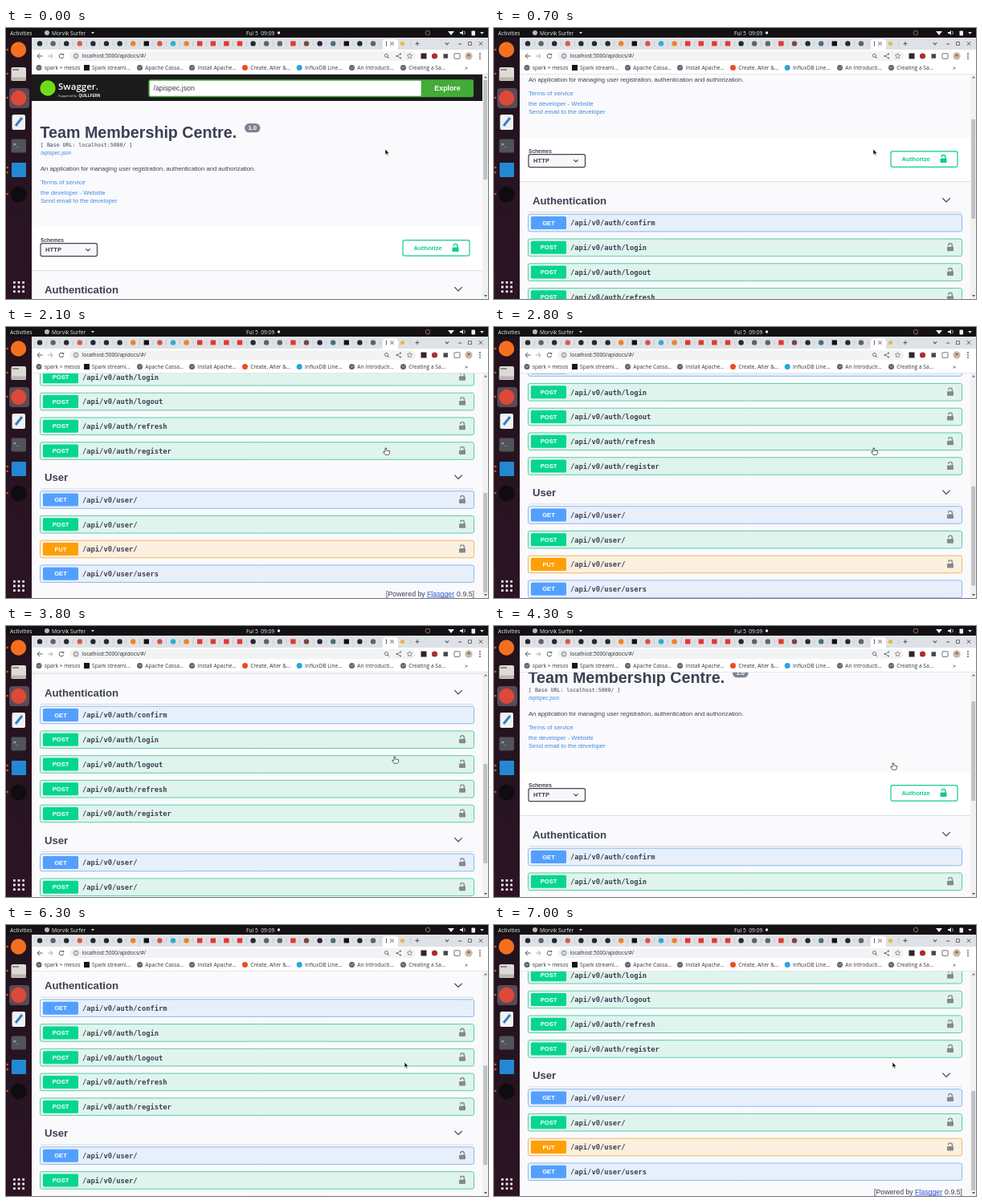
Write an HTML page with a canvas that moves like this. It is 600 px wide and 338 px high and loops after 7.1 s.

```html
<!DOCTYPE html>
<html lang="en">
<head>
<meta charset="utf-8">
<title>API docs</title>
<style>
html, body { margin: 0; width: 100%; height: 100%; overflow: hidden; background: #fff; }
canvas { display: block; width: 600px; height: 338px; }
</style>
</head>
<body>
<canvas id="stage"></canvas>
<script>
const LOOP = 7100, STEP = 100, W = 600, H = 338, TOP = 58, MAX_SCROLL = 322.5;
const SANS = '"Liberation Sans", Arial, sans-serif';
const MONO = '"DejaVu Sans Mono", monospace';
const UI = '"Open Sans", "Noto Sans", sans-serif';
const INK = '#3b4151', LINK = '#4688dd', GREEN = '#0dce8b';

const canvas = document.getElementById('stage');
const ctx = canvas.getContext('2d');
const dpr = window.devicePixelRatio || 1;
canvas.width = W * dpr;
canvas.height = H * dpr;

// Each key: time in ms followed by its values.
const scrollKeys = [[0, 0], [1300, 206], [2050, 322.5], [2500, 322.5], [2800, 303.5],
  [3800, 243], [4300, 66], [4550, 0], [5100, 0], [5700, 106], [6600, 322.5]];
const pointerKeys = [[0, 472, 151], [2900, 472, 151], [3800, 483, 163], [4300, 496, 171]];

const METHODS = {
  GET: { main: '#539fff', back: '#e7effb', edge: '#8abbea' },
  POST: { main: '#05d68f', back: '#dff4ed', edge: '#58cfa9' },
  PUT: { main: '#ff9f05', back: '#fbefdf', edge: '#f5b955' }
};
const OPERATIONS = [
  ['GET', 'auth/confirm', true], ['POST', 'auth/login'], ['POST', 'auth/logout'],
  ['POST', 'auth/refresh'], ['POST', 'auth/register'],
  ['GET', 'user/'], ['POST', 'user/'], ['PUT', 'user/'], ['GET', 'user/users', true]
];

function sample(keys, t) {
  const i = keys.findIndex(k => k[0] > t);
  if (i < 0) return keys[keys.length - 1].slice(1);
  const a = keys[i - 1], b = keys[i], p = (t - a[0]) / (b[0] - a[0]);
  return a.slice(1).map((v, n) => v + (b[n + 1] - v) * p);
}

function rect(x, y, w, h, fill) {
  ctx.fillStyle = fill;
  ctx.fillRect(x, y, w, h);
}

function box(x, y, w, h, r, fill, stroke, width = 1) {
  ctx.beginPath();
  ctx.roundRect(x, y, w, h, r);
  if (fill) { ctx.fillStyle = fill; ctx.fill(); }
  if (stroke) { ctx.strokeStyle = stroke; ctx.lineWidth = width; ctx.stroke(); }
}

function dot(x, y, r, fill) {
  ctx.beginPath();
  ctx.arc(x, y, r, 0, Math.PI * 2);
  ctx.fillStyle = fill;
  ctx.fill();
}

function ring(x, y, r, color, width = 1, from = 0, to = Math.PI * 2) {
  ctx.beginPath();
  ctx.arc(x, y, r, from, to);
  ctx.strokeStyle = color;
  ctx.lineWidth = width;
  ctx.stroke();
}

function line(points, color, width = 1) {
  ctx.beginPath();
  points.forEach(([x, y]) => ctx.lineTo(x, y));
  ctx.strokeStyle = color;
  ctx.lineWidth = width;
  ctx.stroke();
}

function shape(points, fill, stroke) {
  ctx.beginPath();
  points.forEach(([x, y]) => ctx.lineTo(x, y));
  ctx.closePath();
  ctx.fillStyle = fill;
  ctx.fill();
  if (stroke) { ctx.strokeStyle = stroke; ctx.lineWidth = 0.7; ctx.stroke(); }
}

function text(str, x, y, size, color = INK, { family = SANS, weight = 400, align = 'left' } = {}) {
  ctx.font = `${weight} ${size}px ${family}`;
  ctx.textAlign = align;
  ctx.fillStyle = color;
  ctx.fillText(str, x, y);
}

const bold = { weight: 700 }, boldCenter = { weight: 700, align: 'center' };

function chevron(x, y, r, color = INK) {
  line([[x - r, y - r / 2], [x, y + r / 2], [x + r, y - r / 2]], color, 1.2);
}

function cross(x, y, r, color, width) {
  line([[x - r, y - r], [x + r, y + r]], color, width);
  line([[x + r, y - r], [x - r, y + r]], color, width);
}

function lock(x, y, color) {
  box(x - 4, y - 0.5, 8, 5.5, 0.8, color);
  ctx.beginPath();
  ctx.moveTo(x + 2.4, y);
  ctx.lineTo(x + 2.4, y - 2.2);
  ctx.arc(x, y - 2.2, 2.4, 0, Math.PI, true);
  ctx.strokeStyle = color;
  ctx.lineWidth = 1.4;
  ctx.stroke();
}

function globe(x, y) {
  dot(x, y, 3.5, '#5f6368');
  line([[x - 2, y - 1], [x, y + 1], [x + 2, y - 1.5]], '#c9ccd0', 0.8);
}

function section(name, y) {
  text(name, 48, y + 4.5, 13.15, INK, bold);
  chevron(563, y - 0.5, 4.7);
  rect(43, y + 14, 539, 0.8, '#cfd2d8');
}

function operation([method, path, open], i) {
  const y = i < 5 ? 354 + i * 30.75 : 538 + (i - 5) * 30.75;
  const { main, back, edge } = METHODS[method];
  box(42.5, y - 10.8, 540, 21.6, 2.2, back, edge);
  box(46, y - 8, 44, 16, 1.6, main);
  text(method, 68, y + 2.5, 7.6, '#fff', boldCenter);
  text('/api/v0/' + path, 95, y + 3.4, 8.77, INK, { family: MONO, weight: 700 });
  if (!open) lock(568, y - 0.5, '#85898c');
}

function header() {
  rect(32, 58, 561, 33, '#1b1b1b');
  dot(52, 75, 9.7, '#6fdc18');
  text('Swagger.', 65, 77, 11.5, '#fff', { family: UI, weight: 600 });
  text('Supported by', 65, 85.5, 3.9, '#ddd');
  text('QUILLFERN', 90.5, 85.5, 4.7, '#fff', bold);
  box(178, 65, 339.5, 20.5, 2, '#fff', '#4aa53d', 1.5);
  text('/apispec.json', 183.5, 77.8, 8.8);
  box(517, 64.3, 65, 22, [0, 2, 2, 0], '#43ab36');
  text('Explore', 549.5, 77.8, 8.8, '#fff', boldCenter);
}

function info() {
  text('Team Membership Centre.', 42.5, 137, 19.7, INK, bold);
  box(297, 119, 19.5, 11.3, 5.6, '#7d8492');
  text('1.0', 306.8, 127.4, 7.6, '#fff', boldCenter);
  text('[ Base URL: localhost:5000/ ]', 43, 147.8, 6.55, INK, { family: MONO });
  text('/apispec.json', 43, 157.7, 6.58, LINK);
  text('An application for managing user registration, authentication and authorization.', 43, 177.6, 7.68);
  text('Terms of service', 43, 195.3, 7.68, LINK);
  text('the developer - Website', 43, 208, 7.68, LINK);
  text('Send email to the developer', 43, 218, 7.68, LINK);
}

function schemes() {
  rect(32, 248, 561, 54, '#fff');
  rect(32, 302, 561, 1, '#dcdde0');
  text('Schemes', 43, 267, 6.58, INK, bold);
  box(43, 268.6, 70.5, 16, 2.2, '#f8f8fa', '#41444e', 1.2);
  text('HTTP', 49, 279, 7.67, INK, bold);
  chevron(102, 276.6, 2.6);
  box(494, 264.7, 83, 19.5, 2.2, '#fff', GREEN, 1.2);
  text('Authorize', 507.5, 276.5, 7.67, GREEN, bold);
  lock(559.5, 274, GREEN);
}

function footer() {
  text('[Powered by ', 473, 658, 8.77);
  text('Flasgger', 524, 658, 8.77, '#2f55c7');
  rect(524, 659.2, 34, 0.7, '#2f55c7');
  text('0.9.5]', 583, 658, 8.77, INK, { align: 'right' });
}

function page(scroll) {
  ctx.save();
  ctx.beginPath();
  ctx.rect(32, TOP, 561, H - TOP);
  ctx.clip();
  rect(32, TOP, 561, H - TOP, '#fafafd');
  ctx.translate(0, -scroll);
  header();
  info();
  schemes();
  section('Authentication', 326);
  section('User', 510);
  OPERATIONS.forEach(operation);
  footer();
  ctx.restore();

  rect(593, TOP, 7, H - TOP, '#f1f1f2');
  rect(594.3, 65 + scroll / MAX_SCROLL * 142, 4.8, 124, '#bfc0c2');
  shape([[595, 62.5], [597, 60], [599, 62.5]], '#777');
  shape([[595, 333], [597, 335.5], [599, 333]], '#555');
}

function systemBar() {
  rect(0, 0, W, 12, '#131113');
  const style = { family: UI };
  text('Activities', 5, 8.5, 6.7, '#eee', style);
  dot(51, 6, 3, '#b9b9b9');
  text('Morvik Surfer', 57, 8.5, 6.7, '#eee', style);
  shape([[106, 5], [110, 5], [108, 7.5]], '#ddd');
  text('Ful 5  09:09', 299, 8.5, 6.7, '#eee', style);
  dot(339.5, 6, 1.7, '#eee');
  ring(525, 6, 2.8, '#a5706c', 0.9);
  shape([[550, 4], [558, 4], [554, 9]], '#eee');
  shape([[565, 5], [567, 5], [569, 3], [569, 9], [567, 7], [565, 7]], '#eee');
  ring(568.5, 6, 2.8, '#eee', 0.8, -0.9, 0.9);
  box(579.5, 3.5, 4.5, 6, 0.7, '#eee');
  shape([[590, 5], [595, 5], [592.5, 7.7]], '#ddd');
}

function tabs() {
  rect(32, 12, 568, 15, '#dee1e6');
  const dark = '#24292e', grey = '#5f6368', black = '#111', red = '#e3382f', orange = '#f08125';
  const colors = [dark, grey, dark, '#d95a4e', dark, dark, dark, orange, black, '#d94f48', '#2cacd3',
    orange, red, red, red, red, dark, grey, grey, red, '#7a4540', dark, '#47707c', black, dark, grey];
  colors.forEach((color, i) => {
    const x = 42 + i * 16.6;
    if (color === black || color === red) rect(x - 3.2, 16.4, 6.4, 6, color);
    else dot(x, 19.4, 3.2, color);
    rect(x + 8, 16.5, 0.5, 6, '#b3b6bb');
  });
  box(469, 14, 19, 13, [4, 4, 0, 0], '#fff');
  rect(473, 16.5, 1, 6, grey);
  cross(480.5, 19.5, 2.1, '#444', 0.9);
  dot(493.5, 19.5, 2.6, '#e9b44a');
  rect(503, 16.5, 0.5, 6, '#b3b6bb');
  line([[509.5, 19.5], [514.5, 19.5]], '#555');
  line([[512, 17], [512, 22]], '#555');
  chevron(549, 19.5, 2.2, '#555');
  line([[563, 20], [567, 20]], '#555');
  box(575.5, 17.5, 4, 4, 0, null, '#555', 0.8);
  cross(591, 19.5, 2.2, '#444', 0.9);
}

function toolbar() {
  rect(32, 27, 568, 31, '#fff');
  line([[45.5, 35], [39, 35]], '#555');
  line([[42, 32], [39, 35], [42, 38]], '#555');
  line([[52, 35], [58, 35]], '#aaa');
  line([[55.5, 32], [58, 35], [55.5, 38]], '#aaa');
  ring(69, 35, 2.8, '#555', 1, 0.2, 5.4);
  shape([[69.5, 34], [72.2, 34], [72.2, 31.5]], '#555');
  box(79, 29, 431, 12, 6, '#f1f3f4');
  ring(87, 35, 2.9, '#5f6368', 0.8);
  rect(86.6, 34.5, 0.8, 2.2, '#5f6368');
  rect(86.6, 33, 0.8, 0.8, '#5f6368');
  text('localhost:5000/apidocs/#/', 94.5, 37.3, 6.6, '#292b2e', { family: UI });

  ring(473.5, 34.5, 2.1, '#666', 0.9);
  line([[475, 36], [477, 38]], '#666');
  const share = [[491, 32.5], [486.5, 35], [491, 37.5]];
  line(share, '#666', 0.8);
  share.forEach(([x, y]) => dot(x, y, 1, '#666'));
  const star = Array.from({ length: 10 }, (_, i) => {
    const a = i * Math.PI / 5 - Math.PI / 2, r = i % 2 ? 1.5 : 3.4;
    return [502.5 + r * Math.cos(a), 35 + r * Math.sin(a)];
  });
  shape(star, '#fff', '#666');
  rect(516.5, 31.5, 7, 7, '#352329');
  dot(533.5, 35, 3.6, '#a8302c');
  rect(544.5, 32.3, 5.5, 5.5, '#44484e');
  box(558, 31.8, 7, 6.5, 0.5, null, '#5f6368', 0.9);
  dot(576, 35, 4.7, '#c9b9a8');
  dot(576, 34, 1.6, '#786b64');
  [32, 35, 38].forEach(y => dot(590, y, 0.9, '#555'));
}

function bookmarks() {
  const entries = [[47.8, 'spark + mesos'], [107, 'Spark streami…', '#151515'], [173.3, 'Apache Cassa…'],
    [238.3, 'Install Apache…'], [304.3, 'Create, Alter &…', '#ef4a27'], [372, 'InfluxDB Line…', '#2aa5dd'],
    [437.3, 'An Introducti…'], [501.3, 'Creating a Sa…']];
  entries.forEach(([x, label, color], i) => {
    if (!color) globe(x - 6.8, 49.5);
    else if (i === 1) rect(x - 10, 46, 7, 7, color);
    else dot(x - 6.8, 49.5, 3.5, color);
    text(label, x, 52, 6.65, '#35373b', { family: UI });
  });
  text('»', 571, 52, 8, '#444', { family: UI });
  rect(32, 57.3, 568, 0.7, '#dadce0');
}

function launcher() {
  const shade = ctx.createLinearGradient(0, 12, 0, H);
  shade.addColorStop(0, '#21131d');
  shade.addColorStop(1, '#2c1424');
  rect(0, 12, 32, H - 12, shade);
  box(4, 75, 25, 25, 4, '#594b55');
  dot(15.5, 27, 9.7, '#f4701f');
  box(6.5, 49, 18.5, 17, 2, '#dedbd6');
  rect(8, 51, 8, 2, '#8d8983');
  rect(6.5, 61.5, 18.5, 4, '#bab5af');
  dot(15.7, 87.5, 9.7, '#dc4938');
  box(7.5, 108, 16.5, 19, 2, '#f1f1f1');
  line([[12, 122], [20, 112]], '#3280c9', 3);
  box(6.5, 138.5, 18.5, 17, 2, '#50535a');
  text('>_', 9, 147, 6, '#fff', { family: MONO });
  box(7, 168, 18, 18, 1, '#2388d2');
  dot(15.7, 207.5, 10, '#0e0c0f');
  [27, 57, 87, 174, 180, 207].forEach(y => dot(1.7, y, 1.2, '#e95420'));
  for (let i = 0; i < 9; i++) box(9 + i % 3 * 5.6, 316 + Math.floor(i / 3) * 5.6, 2.8, 2.8, 0.6, '#f2f2f2');
}

function pointer(x, y, hand) {
  ctx.save();
  ctx.translate(x, y);
  if (hand) {
    shape([[-0.8, 0], [0.8, 0], [1, 3], [5, 3.8], [4.7, 6.7], [3.6, 8.3], [-0.8, 8.3],
      [-3.2, 5], [-2.7, 4.2], [-0.8, 5]], '#fff', '#222');
  } else {
    shape([[0, 0], [0, 7.2], [1.7, 5.7], [2.9, 8.2], [4, 7.6], [2.9, 5.2], [5, 5]], '#151515', '#eee');
  }
  ctx.restore();
}

function draw(t) {
  ctx.setTransform(dpr, 0, 0, dpr, 0, 0);
  page(sample(scrollKeys, t)[0]);
  systemBar();
  tabs();
  toolbar();
  bookmarks();
  launcher();
  const hand = t >= 1500 && t < 4700;
  const [x, y] = sample(pointerKeys, t);
  pointer(x + (hand ? 0.8 : 0), y, hand);
}

const start = performance.now();
function tick(now) {
  const t = Math.max(0, now - start) % LOOP;
  draw(Math.floor(t / STEP) * STEP);
  requestAnimationFrame(tick);
}
draw(0);
requestAnimationFrame(tick);
</script>
</body>
</html>
```
